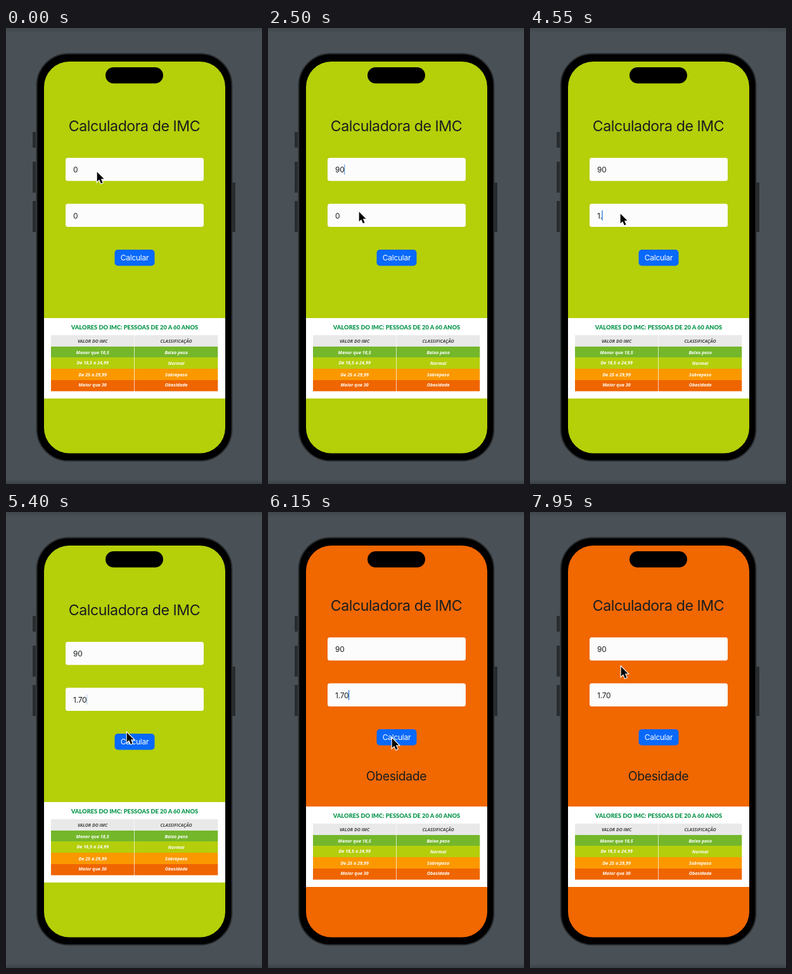
An HTML page for the animation above (8000 ms loop, 404 by 720 pixels).

```html
<!DOCTYPE html>
<html lang="pt">
<head>
<meta charset="utf-8">
<style>
  html, body { margin: 0; width: 100%; height: 100%; overflow: hidden; background: #495157; }
  svg { display: block; width: 100%; height: 100%; }
  text { font-family: Inter, sans-serif; font-size: 12px; letter-spacing: -.02em; fill: #1b1e20; }
  .mid { text-anchor: middle; }
  .table text { font: italic 700 7.2px "Open Sans", sans-serif; letter-spacing: 0; fill: #fff; text-anchor: middle; }
  .table .head { fill: #444; font-size: 7px; }
  .table .title { font: 900 9.3px Lato, sans-serif; fill: #129a52; }
</style>
</head>
<body>
<svg viewBox="0 0 404 720">
  <defs>
    <linearGradient id="wall" x2="0" y2="1">
      <stop stop-color="#41484d"/><stop offset=".012" stop-color="#495157"/>
      <stop offset=".99" stop-color="#495157"/><stop offset="1" stop-color="#3b4247"/>
    </linearGradient>
  </defs>
  <rect width="404" height="720" fill="url(#wall)"/>
  <g fill="#292c2e">
    <rect x="42" y="164" width="5" height="25" rx="1"/>
    <rect x="42" y="211" width="5" height="49" rx="1"/>
    <rect x="42" y="273" width="5" height="49" rx="1"/>
    <rect x="357" y="244" width="5" height="78" rx="1"/>
  </g>
  <rect x="48.5" y="40.5" width="308" height="643" rx="50" fill="#000" stroke="#2b2e30" stroke-width="2"/>
  <rect x="51" y="43" width="303" height="638" rx="48"/>
  <rect id="screen" x="60" y="53" width="286" height="618.5" rx="40"/>
  <rect x="157" y="62" width="91" height="25.5" rx="12.7"/>

  <g id="form">
    <text class="mid" x="202.5" y="163" style="font-size:23.2px">Calculadora de IMC</text>
    <rect x="94" y="205" width="218" height="36.5" rx="3.5" fill="#fcfcfc"/>
    <rect x="94" y="277.5" width="218" height="36.5" rx="3.5" fill="#fcfcfc"/>
    <text id="weight" x="106" y="228"/>
    <text id="height" x="106" y="300.5"/>
    <rect id="caret" width="1.3" height="16" fill="#2879d8"/>
    <rect x="171.5" y="350" width="63" height="25.5" rx="5" fill="#0869fb"/>
    <text class="mid" x="203" y="367.3" style="fill:#fff">Calcular</text>
  </g>
  <text id="result" class="mid" x="202.5" y="424" style="font-size:19.4px">Obesidade</text>
  <g id="table" class="table">
    <rect x="60" y="458" width="286" height="127" fill="#fff"/>
    <text class="title" x="203" y="476">VALORES DO IMC: PESSOAS DE 20 A 60 ANOS</text>
  </g>
  <path id="pointer" d="M.7 1.2V16.6L4.2 13.3L6.9 19.5L9.6 18.3L6.9 12.2H11.6Z" stroke="#fff" stroke-width="2.2" paint-order="stroke"/>
</svg>
<script>
const $ = id => document.getElementById(id);
const DURATION = 8000, RESULT_AT = 5750;

const rows = [
  ['VALOR DO IMC', 'CLASSIFICAÇÃO', '#e9e9e9', 485, 497],
  ['Menor que 18,5', 'Baixo peso', '#74b72b', 503, 514.5],
  ['De 18,5 a 24,99', 'Normal', '#b4ce0b', 520, 531],
  ['De 25 a 29,99', 'Sobrepeso', '#fb9800', 538, 550],
  ['Maior que 30', 'Obesidade', '#ef6500', 556, 566],
];
$('table').innerHTML += rows.map(([left, right, color, top, base], i) => {
  const bottom = rows[i + 1]?.[3] ?? 573.5;
  const cell = (x, width, label, dy) =>
    `<rect x="${x}" y="${top}" width="${width}" height="${bottom - top}" fill="${color}"/>
     <text class="${i ? '' : 'head'}" x="${x + width / 2}" y="${base + dy}">${label}</text>`;
  return cell(71, 131.3, left, 0) + cell(203, 131.3, right, i === 2 ? 1 : 0);
}).join('');

// Each entry: [start time, value]; the last one reached applies.
const weightKeys = [[0, '0'], [900, ''], [1600, '9'], [1850, '90']];
const heightKeys = [[0, '0'], [3300, ''], [4300, '1'], [4430, '1.'], [4560, '1.7'], [4700, '1.70']];
const focusTimes = [500, 2700];
// Each entry: [start, end, x, y] reached at the end.
const moves = [[0, 0, 143, 226], [1900, 2400, 143, 289], [2800, 3300, 142, 292],
  [4850, 5350, 190, 347], [5400, 5650, 195, 356], [6800, 7400, 143, 243]];

const latest = (keys, t) => keys.filter(([start]) => start <= t).pop();

function pointerAt(t) {
  let [x, y] = moves[0].slice(2);
  for (const [start, end, toX, toY] of moves.slice(1)) {
    const p = Math.min(1, Math.max(0, (t - start) / (end - start)));
    const eased = p * p * (3 - 2 * p);
    x += (toX - x) * eased;
    y += (toY - y) * eased;
  }
  return [x, y];
}

function caretOpacity(age) {
  const phase = age % 1100;
  if (phase < 600) return 1;
  return Math.max(0, 1 - (phase - 600) / 150);
}

function showField(id, value, placeholder) {
  $(id).textContent = value || placeholder;
  $(id).style.fill = value ? '' : '#c3c3c6';
}

function draw(t) {
  const done = t >= RESULT_AT;
  const weight = latest(weightKeys, t)[1], height = latest(heightKeys, t)[1];
  showField('weight', weight, 'Peso');
  showField('height', height, 'Altura');

  const onHeight = t >= focusTimes[1];
  const field = $(onHeight ? 'height' : 'weight');
  const textWidth = (onHeight ? height : weight) ? field.getComputedTextLength() : 0;
  const lastReset = Math.max(...[...weightKeys, ...heightKeys].map(k => k[0])
    .concat(focusTimes).filter(time => time <= t));
  $('caret').setAttribute('x', 105.5 + textWidth);
  $('caret').setAttribute('y', onHeight ? 288 : 215.5);
  $('caret').setAttribute('opacity', t < focusTimes[0] ? 0 : caretOpacity(t - lastReset));

  $('screen').setAttribute('fill', done ? '#f16700' : '#b5cf08');
  $('form').setAttribute('transform', `translate(0 ${done ? -7 : 0})`);
  $('table').setAttribute('transform', `translate(0 ${done ? 7 : 0})`);
  $('result').setAttribute('visibility', done ? 'visible' : 'hidden');
  $('pointer').setAttribute('transform', `translate(${pointerAt(t)})`);
}

function frame() {
  draw(performance.now() % DURATION);
  requestAnimationFrame(frame);
}
frame();
</script>
</body>
</html>
```
